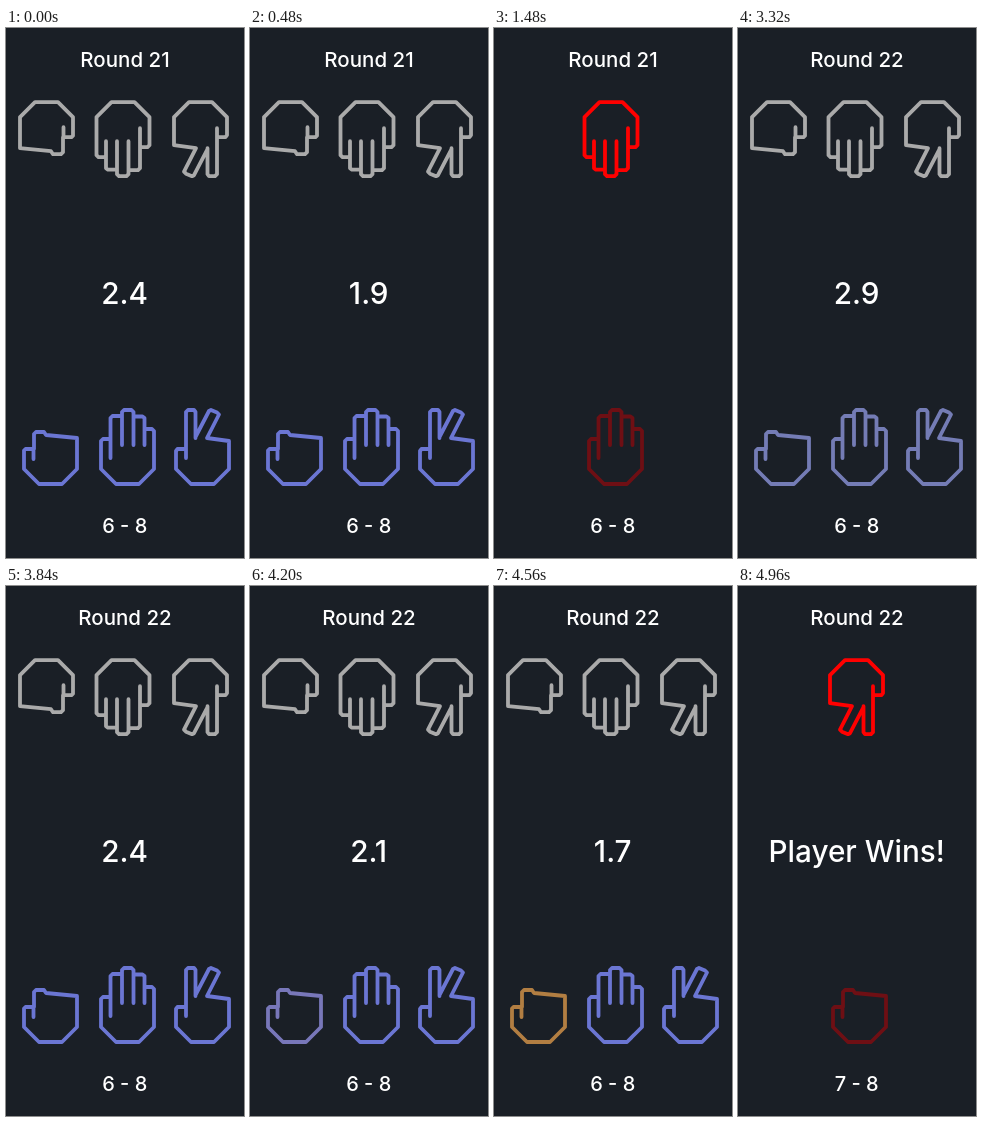
Recreate the animation shown at these times as an HTML page. Size 238 by 530 pixels, loop 5000 ms.

```html
<!DOCTYPE html>
<html lang="en">
<head>
<meta charset="utf-8">
<title>Rock paper scissors</title>
<style>
  html, body { margin: 0; width: 100%; height: 100%; overflow: hidden; background: #1a1f26; }
  svg { display: block; width: 100%; height: 100%; }
  text { font-family: Inter, "Open Sans", sans-serif; font-weight: 500; fill: #fff; text-anchor: middle; }
  path { fill: none; stroke-width: 3.8; stroke-linejoin: round; stroke-linecap: round; }
</style>
</head>
<body>
<svg id="stage" viewBox="0 0 238 530">
  <text id="round" x="119" y="39.3" font-size="20.5"></text>
  <text id="message" x="118.7" y="276" font-size="29.7"></text>
  <text id="score" x="118.7" y="505" font-size="20"></text>
</svg>
<script>
const LOOP = 5000;
const GREY = [170, 170, 170], BLUE = [107, 118, 211], DIM_BLUE = [116, 124, 180];
const ORANGE = [178, 126, 66], RED = [255, 0, 0], DARK_RED = [110, 15, 20];
const ROCK = 0, PAPER = 1, SCISSORS = 2;

// Each hand is drawn upright; the rival's hands are turned by 180 degrees.
const shapes = [
  'M9.5 51V41H1.5L0 42.5V61L15 76H38L53 61V30L22 27L20 24H12L10 26V41',
  'M9.5 50V31H2L0 33V61L15 76H38L53 61V23L51 21H43.5M43.5 37V10L41.5 8.5H32.5' +
    'M32.5 37V4L30.5 2H23L21 4V37M21 8H11.5L9.5 10V31',
  'M10 50V41H1.5L0 43V61L15 76H38L53 61V33L31 30L43 6.5L41 4.5L35 2L33 3L20 28' +
    'M19.5 30V4L18 2H12L10 4V41'
];
const topX = [67, 143.5, 221], topChosenX = [143.5, 143.5, 145];
const bottomX = [18, 95, 170], bottomChosenX = 95;

// Times in ms; "start" is when the three second countdown of the round began.
const rounds = [
  { start: -565, hover: 600, click: 800, hide: 1400, title: 'Round 21',
    player: PAPER, rival: PAPER, result: 'Draw!', before: '6 - 8', after: '6 - 8' },
  { start: 3310, hover: 4130, click: 4640, hide: LOOP, title: 'Round 22',
    player: ROCK, rival: SCISSORS, result: 'Player Wins!', before: '6 - 8', after: '7 - 8' }
];

const byId = id => document.getElementById(id);
const stage = byId('stage'), round = byId('round'), message = byId('message'), score = byId('score');

function addHand(d) {
  const path = document.createElementNS('http://www.w3.org/2000/svg', 'path');
  path.setAttribute('d', d);
  return stage.appendChild(path);
}
const topHands = shapes.map(addHand), bottomHands = shapes.map(addHand);

const progress = (t, start, length) => Math.min(1, Math.max(0, (t - start) / length));
const mix = (a, b, p) => a.map((v, i) => v + (b[i] - v) * p);
const countdown = ms => ((29 - Math.floor(ms / 100)) / 10).toFixed(1);

function place(hand, transform, color, visible) {
  hand.setAttribute('transform', transform);
  hand.setAttribute('stroke', `rgb(${color.map(Math.round)})`);
  hand.setAttribute('visibility', visible ? 'visible' : 'hidden');
}

function draw(t) {
  const r = t < rounds[1].start ? rounds[0] : rounds[1];
  const chosen = t >= r.click;
  const reveal = progress(t, r.click, 320);

  round.textContent = r.title;
  score.textContent = chosen ? r.after : r.before;
  message.textContent = !chosen ? countdown(t - r.start) : t < r.hide ? r.result : '';

  topHands.forEach((hand, i) => {
    const x = chosen ? topChosenX[i] : topX[i];
    place(hand, `translate(${x} 150.2) rotate(180)`, mix(GREY, RED, reveal), !chosen || i === r.rival);
  });
  bottomHands.forEach((hand, i) => {
    let color = mix(DIM_BLUE, BLUE, progress(t, r.start, 350));
    if (i === r.player) {
      color = mix(color, ORANGE, progress(t, r.hover, 400));
      color = mix(color, DARK_RED, reveal);
    }
    const x = chosen ? bottomChosenX : bottomX[i];
    place(hand, `translate(${x} 380)`, color, !chosen || i === r.player);
  });
}

const began = performance.now();
function tick() {
  draw((performance.now() - began) % LOOP);
  requestAnimationFrame(tick);
}
tick();
</script>
</body>
</html>
```
